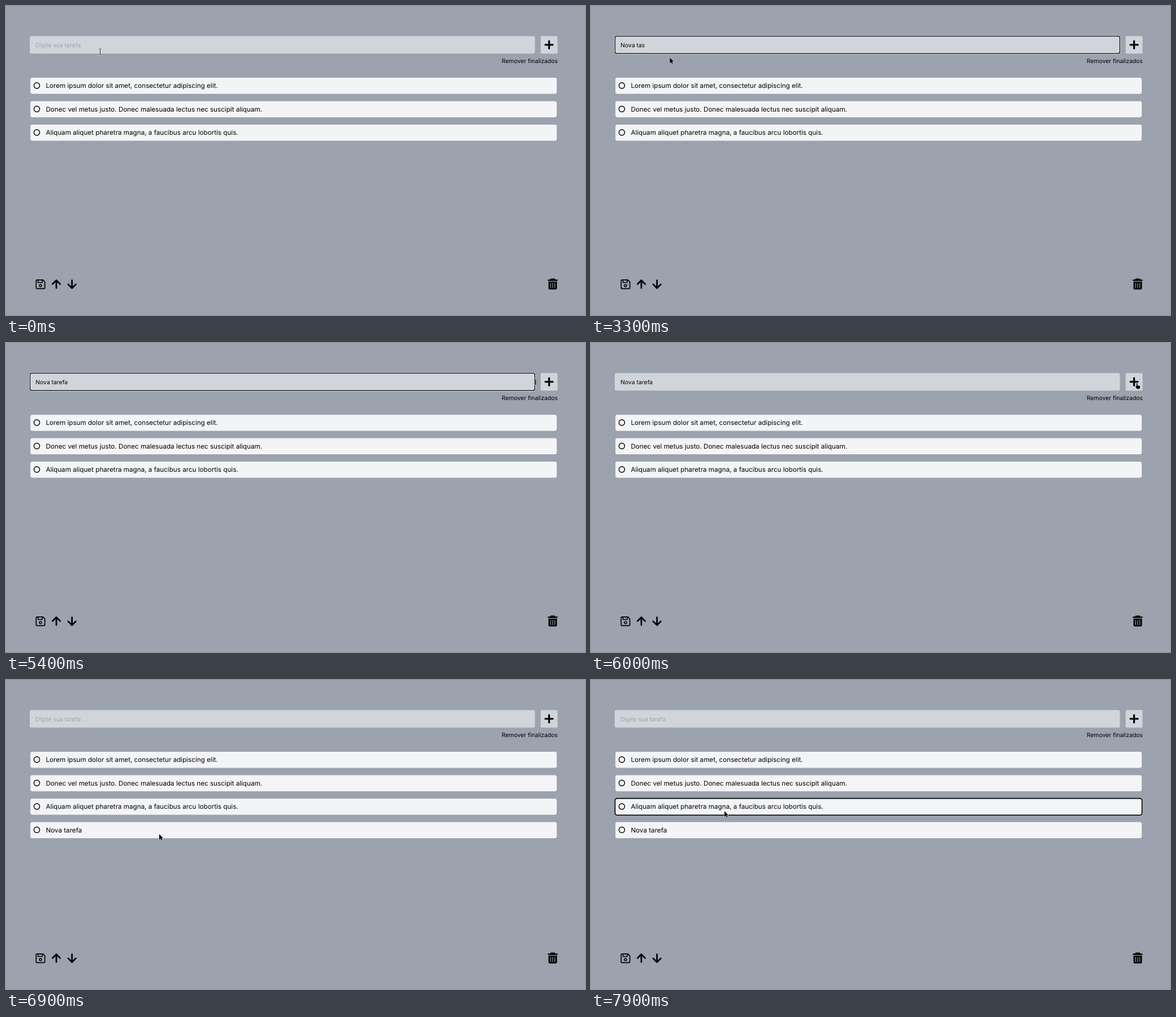
An HTML page for the animation above (8000 ms loop, 1024x547 px).

```html
<!DOCTYPE html>
<html lang="pt">
<head>
<meta charset="utf-8">
<title>Lista de tarefas</title>
<style>
  html, body { margin: 0; width: 100%; height: 100%; overflow: hidden; background: #9ca3af; }
  svg { display: block; width: 100%; height: 100%; }
  text { font: 10.37px Inter, sans-serif; white-space: pre; text-rendering: geometricPrecision; }
  .field { fill: #d1d5db; }
  .card { fill: #f3f4f6; }
  .label { font-size: 11.66px; }
  .hint { fill: #9ca3af; }
  .line { fill: none; stroke: #000; stroke-linecap: round; stroke-linejoin: round; }
  .pointer { stroke: #fff; stroke-width: .9; stroke-linejoin: round; paint-order: stroke; }
</style>
</head>
<body>
<svg viewBox="0 0 1024 547">
  <rect class="field" x="42" y="53.2" width="893.4" height="31" rx="3"/>
  <g id="focus" fill="none">
    <rect x="42.5" y="53.6" width="892.8" height="30.4" rx="3.2" stroke="#fff" stroke-width="2.9"/>
    <rect x="42.5" y="53.6" width="892.8" height="30.4" rx="3.2" stroke="#101010" stroke-width="1.5"/>
  </g>
  <text id="hint" class="hint" x="52.3" y="72.6">Digite sua tarefa</text>
  <text id="typed" x="52.3" y="72.6"></text>
  <rect id="caret" y="62.4" width=".8" height="12.5"/>

  <rect class="field" x="945.6" y="53.2" width="29.8" height="31" rx="1.6"/>
  <path class="line" stroke-width="3.2" d="M954 68.7h13M960.5 62.2v13"/>
  <text x="975.8" y="101.1" text-anchor="end">Remover finalizados</text>

  <g id="list"></g>
  <rect id="pick" class="line" x="42.5" y="209.6" width="932" height="29.6" rx="3.8" stroke-width="1.6"/>

  <g class="line" stroke-width="1.7">
    <path d="M55 484.9h10.3l3.4 3.4v10.3q0 1.7-1.7 1.7H55q-1.7 0-1.7-1.7v-12q0-1.7 1.7-1.7Z"/>
    <path stroke-width="1.5" d="M56.6 485.3v4.2h7.6v-4.2"/>
    <circle cx="61" cy="495" r="2" stroke-width="1.5"/>
  </g>
  <path class="line" stroke-width="2.7" d="M89 486v13.3M82.3 492.2l6.7-6.7 6.7 6.7M116.7 485.6v13.3M110 492.8l6.7 6.7 6.7-6.7"/>

  <path d="M963.2 482.5h7.4l1 1.7h3.2q.8 0 .8.8v1q0 .7-.8.7H959q-.8 0-.8-.7v-1q0-.8.8-.8h3.2Z"/>
  <path d="M959.4 488h15v11.6q0 2.2-2.2 2.2h-10.6q-2.2 0-2.2-2.2Z"/>
  <path d="M963.2 490.9v7.8M966.9 490.9v7.8M970.6 490.9v7.8" stroke="#9ca3af" stroke-width="1.2" stroke-linecap="round"/>

  <g id="mouse">
    <path id="arrow" class="pointer" d="M.3.3v10.1l2.3-2.1 1.6 3.5 1.6-.7-1.6-3.5h3.1Z"/>
    <path id="hand" class="pointer" d="M-.9 6V.8a.9.9 0 0 1 1.8 0v3.1l3.9.8q.9.2.8 1.2l-.7 4.3H0l-2.5-3.5Q-3 5.4-1.8 5.3Z"/>
    <g id="beam" fill="none">
      <path d="M-2-5Q0-5 0-4V4Q0 5-2 5M2-5Q0-5 0-4V4Q0 5 2 5" stroke="#fff" stroke-opacity=".6" stroke-width="1.9"/>
      <path d="M-2-5Q0-5 0-4V4Q0 5-2 5M2-5Q0-5 0-4V4Q0 5 2 5" stroke="#222" stroke-width=".8"/>
    </g>
  </g>
</svg>
<script>
const LOOP = 8000, STEP = 100;
const el = id => document.getElementById(id);
const show = (id, on) => el(id).setAttribute('visibility', on ? 'visible' : 'hidden');

const tasks = [
  'Lorem ipsum dolor sit amet, consectetur adipiscing elit.',
  'Donec vel metus justo. Donec malesuada lectus nec suscipit aliquam.',
  'Aliquam aliquet pharetra magna, a faucibus arcu lobortis quis.',
  'Nova tarefa'
];
el('list').innerHTML = tasks.map((task, i) => `
  <g id="task${i}" transform="translate(0 ${127 + i * 41.47})">
    <rect class="card" x="43.2" width="930.8" height="28.5" rx="3.4"/>
    <circle class="line" cx="54.5" cy="13.9" r="5.1" stroke-width="1.4"/>
    <text class="label" x="70.4" y="18.4">${task}</text>
  </g>`).join('');

// [start, text]
const typing = [
  [0, ''], [1000, 'N'], [1100, 'No'], [1200, 'Nov'], [1400, 'Nova'],
  [2100, 'Nova '], [2400, 'Nova t'], [2700, 'Nova tas'], [3700, 'Nova ta'],
  [4000, 'Nova tare'], [4200, 'Nova taref'], [4400, 'Nova tarefa'], [6200, '']
];
// [start, caret visible]
const blinks = [
  [0, false], [200, true], [800, false], [1000, true], [2000, false],
  [2100, true], [3300, false], [4000, true], [5000, false], [5500, true], [5900, false]
];
// [start, one point per step]
const moves = [
  [0, [[166.5, 80.7]]],
  [400, [[150, 87], [139, 91]]],
  [4700, [[160, 88], [260, 79], [430, 70], [600, 64], [740, 63.5], [840, 64.5], [905, 67], [936.8, 69], [945, 66]]],
  [5600, [[988, 76]]],
  [5800, [[974, 73], [965.5, 71]]],
  [6200, [[965.5, 72], [930, 112], [830, 190], [690, 255], [530, 291], [400, 301], [310, 290], [270.7, 272.5]]],
  [7100, [[269, 270], [264, 264], [256, 256], [247, 246], [240, 238], [236, 234]]],
  [7800, [[235.7, 231.8]]]
];

const latest = (list, t) => list.findLast(item => item[0] <= t);

function pointerAt(t) {
  const [start, points] = latest(moves, t);
  return points[Math.min(points.length - 1, (t - start) / STEP)];
}

function pointerKind(x, y) {
  if (y < 53 || y > 84) return 'arrow';
  if (x > 42 && x < 938) return 'beam';
  return x > 945.6 && x < 975.4 ? 'hand' : 'arrow';
}

function draw(now) {
  const t = Math.floor(now % LOOP / STEP) * STEP;
  const text = latest(typing, t)[1];
  el('typed').textContent = text;
  el('caret').setAttribute('x', 52.3 + (text ? el('typed').getComputedTextLength() : 0));
  show('caret', latest(blinks, t)[1]);
  show('hint', !text);
  show('focus', t >= 200 && t < 5900);
  show('task3', t >= 6200);
  show('pick', t >= 7800);

  const [x, y] = pointerAt(t), kind = pointerKind(x, y);
  el('mouse').setAttribute('transform', `translate(${x} ${y})`);
  for (const id of ['arrow', 'hand', 'beam']) show(id, id === kind);
}

let origin;
function tick(now) {
  origin ??= now;
  draw(now - origin);
  requestAnimationFrame(tick);
}
draw(0);
requestAnimationFrame(tick);
</script>
</body>
</html>
```
